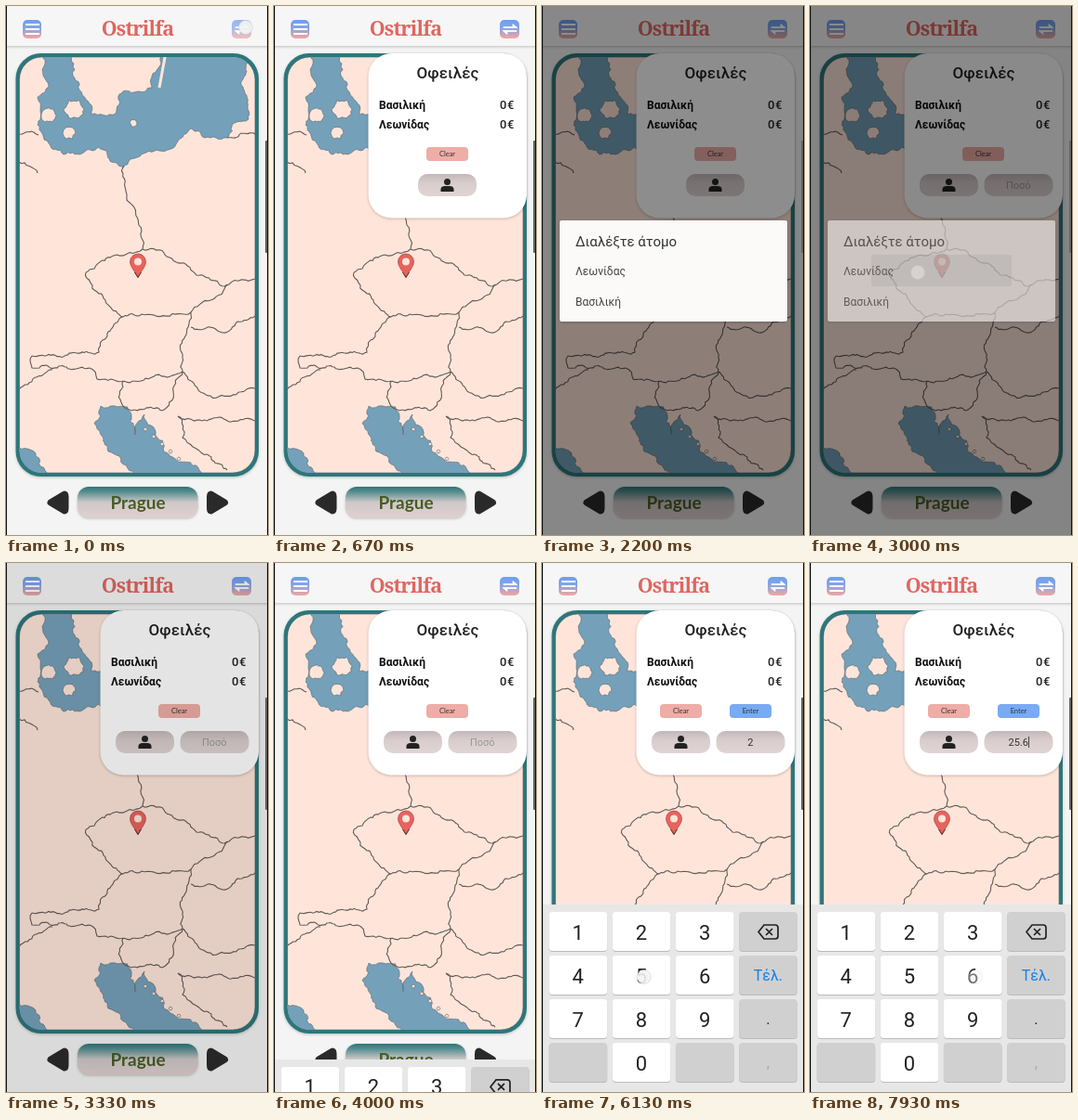
These frames come from a looping animation (282x570 px, 8000 ms). An HTML page:

```html
<!DOCTYPE html>
<html lang="el">
<head>
<meta charset="utf-8">
<title>Travel debts</title>
<style>
html, body { margin: 0; width: 100%; height: 100%; overflow: hidden; background: #f4f4f4; }
svg { display: block; width: 100vw; height: 100vh; font-family: Roboto, sans-serif; }
.lato { font-family: Lato, sans-serif; }
.mid { text-anchor: middle; }
.end { text-anchor: end; }
.shadow { filter: drop-shadow(0 1px 1.5px rgba(0, 0, 0, .22)); }
</style>
</head>
<body>
<svg id="stage" viewBox="0 0 282 570"></svg>
<script>
const LOOP = 8000;
const stage = document.getElementById('stage');

const rect = (x, y, w, h, r, fill, more = '') =>
  `<rect x="${x}" y="${y}" width="${w}" height="${h}" rx="${r}" fill="${fill}" ${more}/>`;
const text = (x, y, size, fill, str, more = '') =>
  `<text x="${x}" y="${y}" font-size="${size}" fill="${fill}" ${more}>${str}</text>`;
const gradient = (id, ...stops) => `<linearGradient id="${id}" x2="0" y2="1">${
  stops.map(([at, color]) => `<stop offset="${at}" stop-color="${color}"/>`).join('')}</linearGradient>`;

// Map: a few key points per line, made rugged by seeded midpoint displacement
let seed = 11;
const random = () => (seed = seed * 16807 % 2147483647) / 2147483647;

function split(a, b) {
  const dx = b[0] - a[0], dy = b[1] - a[1], len = Math.hypot(dx, dy);
  if (len < 4) return [b];
  const k = (random() - .5) * Math.min(.42, 7 / len);
  const m = [(a[0] + b[0]) / 2 - dy * k, (a[1] + b[1]) / 2 + dx * k];
  return [...split(a, m), ...split(m, b)];
}
const trace = pts => 'M' + pts.flatMap((p, i) => i ? split(pts[i - 1], p) : [p])
  .map(p => p.map(v => v.toFixed(1))).join('L');
const rugged = points => trace(points.split(' ').map(p => p.split(',').map(Number)));
const island = (x, y, r) => trace([0, 1, 2, 3, 4, 5, 0].map(i =>
  [x + r * Math.cos(i * Math.PI / 3), y + r * Math.sin(i * Math.PI / 3)]));

const baltic = '37,50 40,75 46,86 34,98 34,128 46,148 62,160 100,152 126,174 165,156 200,132 214,142 ' +
  '238,142 246,126 261,122 253,82 262,50 167,50 157,88 122,95 118,116 92,117 72,75 68,50';
const adriatic = '131,432 102,431 95,450 110,480 150,508 225,508 170,480 149,440 139,462 131,432';
const ligurian = '8,472 32,482 48,508 8,508';
const seas = [baltic, adriatic, ligurian].map(rugged).join('');
const dalmatia = [0, 1, 2, 3, 4].map(i => island(150 + i * 9, 456 + i * 8, 2));
const islands = [island(46, 118, 8), island(73, 111, 11), island(68, 137, 7), island(137, 126, 4), ...dalmatia].join('');
const borders = [
  '127,172 128,195 143,236 147,262',
  '86,287 119,268 147,262 170,266 205,290 240,300 268,294',
  '86,287 98,308 126,335 146,332 199,330 240,300',
  '126,335 104,360 100,373 28,377 28,390 90,390 98,402 145,404 190,394 194,354 199,330',
  '199,346 233,352 268,334',
  '126,404 124,427 135,436 168,436 190,394 220,420 268,412',
  '268,447 185,442 190,465 238,500',
  '14,413 50,392', '14,138 35,139', '14,168 34,180', '238,142 268,138'
].map(rugged).join('');

const map = `<g class="shadow">${rect(10.5, 51, 261.5, 456, 27, '#2d777b')}</g>
  <g clip-path="url(#land)" stroke="#5b6670" stroke-width=".6">${rect(14.5, 55, 253.5, 448, 24, '#ffe5d9')}
  <path d="${seas}" fill="#74a0b9"/><path d="${islands}" fill="#ffe5d9"/>
  <path d="M172 50L165 88" stroke="#ffe5d9" stroke-width="3"/>
  <path d="${borders}" fill="none" stroke="#625a58" stroke-width="1.1"/></g>
  <path d="M142 292.500C139 286 133.500 281 133.500 275.500A8.500 8.500 0 0 1 150.500 275.500C150.500 281 145 286 142 292.500Z" fill="#e9625d" stroke="#a8433f" stroke-width=".7"/>
  <path d="M138.500 287L142 292.500L145.500 287" fill="none" stroke="#5a2b2b"/>
  <circle cx="142" cy="275.500" r="4" fill="#ffe5d9"/>`;

const header = `<g class="shadow">${rect(0, 0, 282, 43, 0, '#f6f6f6')}</g>
  ${text(141.5, 32, 21.5, '#e0665f', 'Ostrilfa', 'class="mid" font-weight="700" letter-spacing="-.8" font-family="Noto Serif, serif"')}
  ${rect(18, 15, 20, 20, 5, 'url(#icon)')}
  <path d="M21 20H36M21 25H36M21 30H36" stroke="#fff" stroke-width="2"/>
  <g id="toggle">${rect(243, 15, 21, 20, 5, 'url(#icon)')}
  <path d="M247 22.500H257V19.500L262 23.500H247ZM261 27.500H251V30.500L246 26.500H261Z" fill="#fff" stroke="#fff" stroke-width=".8"/></g>`;

const arrow = 'M48 535L63 526Q64 526 64 529V541Q64 544 63 544Z';
const footer = `<g fill="#2a2a2a" stroke="#2a2a2a" stroke-width="7" stroke-linejoin="round">
  <path d="${arrow}"/><path d="${arrow}" transform="matrix(-1 0 0 1 283.500 0)"/></g>
  <g class="shadow">${rect(77, 518, 129.5, 33.5, 12, 'url(#city)')}</g>
  ${text(142, 542, 19, '#485c25', 'Prague', 'class="mid lato" font-weight="700"')}`;

const smallButton = (id, x, fill, label) => `<g id="${id}">${rect(x, 152, 45, 15, 4, fill)}
  ${text(x + 22.5, 162, 7.5, '#333', label, 'class="mid lato"')}</g>`;
const debtRow = (y, name) => text(113, y, 12, '#111', name, 'font-weight="700"') +
  text(259, y, 13, '#222', '0€', 'class="end" font-weight="500" letter-spacing=".6"');
const panel = `<g id="panel"><g class="shadow">${rect(101.5, 51, 170.5, 177.5, 25, '#fff')}</g>
  ${text(187, 78, 17, '#222', 'Οφειλές', 'class="mid" font-weight="500"')}
  ${debtRow(111, 'Βασιλική')}${debtRow(132, 'Λεωνίδας')}
  ${smallButton('clear', 164, '#eeada6', 'Clear')}${smallButton('enter', 202, '#79aaf2', 'Enter')}
  <g id="person">${rect(155, 181, 63, 24, 10, 'url(#field)')}${rect(155, 181, 63, 24, 10, '#4b5652', 'id="press"')}
  <circle cx="186.500" cy="189.500" r="3.500" fill="#222"/>
  <path d="M179.500 200V197Q180 194 184 194H189Q193 194 193.500 197V200Z" fill="#222"/></g>
  <g id="amount">${rect(187.5, 181, 74, 24, 10, 'url(#field)')}
  ${text(224.3, 197, 11, '#999', '', 'id="value" class="mid"')}
  ${rect(0, 187, 1, 12, 0, '#444', 'id="caret"')}</g></g>`;

const dialog = `${rect(0, 0, 282, 570, 0, '#000', 'id="dim"')}
  <g id="dialog"><g class="shadow">${rect(19, 231, 245, 109, 2, '#fcf9f9')}</g>
  ${rect(66, 268, 151, 34, 2, '#34554c', 'id="ripple"')}
  ${text(36, 259, 15, '#333', 'Διαλέξτε άτομο')}
  ${text(36, 290, 12, '#444', 'Λεωνίδας')}${text(36, 323, 12, '#444', 'Βασιλική')}</g>`;

const labels = ['1', '2', '3', '⌫', '4', '5', '6', 'Τέλ.', '7', '8', '9', '.', '', '0', '', ','];
const keySpot = i => [7.5 + i % 4 * 68.2, 376 + (i >> 2) * 47];
const keys = labels.map((label, i) => {
  const [x, y] = keySpot(i), digit = /\d/.test(label);
  const color = { ',': '#aaa', 'Τέλ.': '#1180ee' }[label] || '#222';
  const face = label === '⌫'
    ? '<path d="M239 390H251Q254 390 254 393V402Q254 405 251 405H239L233 397.500ZM241 394L248 401M248 394L241 401" fill="none" stroke="#222" stroke-width="1.700"/>'
    : text(x + 31.3, y + (digit ? 29.5 : 27), digit ? 22 : 16, color, label, 'class="mid"');
  return rect(x, y + 1, 62.7, 42, 4, '#bbb') + rect(x, y, 62.7, 42, 4, digit ? '#fff' : '#d0d0d0') + face;
}).join('');

stage.innerHTML = `<defs>
  ${gradient('icon', [0, '#6b9ff2'], [.45, '#86a5e4'], [1, '#f5a59f'])}
  ${gradient('city', [0, '#2b787b'], [.15, '#528b8d'], [.5, '#cfc8c8'], [1, '#e0d0d0'])}
  ${gradient('field', [0, '#c3b8b8'], [.4, '#d8cccc'], [1, '#e0d4d4'])}
  <clipPath id="land">${rect(14.5, 55, 253.5, 448, 24, '#000')}</clipPath></defs>
  ${rect(0, 0, 282, 570, 0, '#f4f4f4')}${map}${footer}${header}${panel}${dialog}
  <g id="keyboard">${rect(0, 368, 282, 202, 0, '#e7e7e7')}${keys}</g>
  <circle id="touch" r="7.500" fill="#f4f4f4" stroke="#ccc" stroke-width=".6"/>
  ${rect(279, 145, 3, 121, 1, '#666')}
  ${rect(0, 0, 1, 570, 0, '#111')}${rect(281, 0, 1, 570, 0, '#111')}`;

const el = Object.fromEntries([...stage.querySelectorAll('[id]')].map(e => [e.id, e]));
const ramp = (t, a, b) => Math.min(1, Math.max(0, (t - a) / (b - a)));
const smooth = k => k * k * (3 - 2 * k);
const show = (e, on) => e.setAttribute('opacity', Number(on));
const move = (e, x, y) => e.setAttribute('transform', `translate(${x} ${y})`);

// Every tap lasts equally long; a tapped key is entered after a fixed delay
const TAP = 330, ENTRY = 200, FOCUS = 4470;
const tap = (at, x, y) => ({ at, x, y });
const keyTap = (at, key) => {
  const [x, y] = keySpot(labels.indexOf(key));
  return { at, x: x + 34, y: y + 23, key };
};
const typing = [keyTap(5400, '2'), keyTap(6000, '5'), keyTap(6540, '.'), keyTap(7670, '6')];
const taps = [tap(-60, 258, 23), tap(1670, 194, 194), tap(2740, 116, 287), tap(3600, 224, 194), ...typing];

function drawAmount(t) {
  const typed = typing.filter(k => t >= k.at + ENTRY);
  const value = typed.map(k => k.key).join('');
  const lastEdit = typed.length ? typed[typed.length - 1].at + ENTRY : FOCUS;
  el.value.textContent = value || 'Ποσό';
  el.value.setAttribute('fill', value ? '#333' : '#999');
  const half = el.value.getComputedTextLength() / 2;
  el.caret.setAttribute('x', 224.3 + (value ? half : -half - .5));
  show(el.caret, t >= FOCUS && (t - lastEdit) % 1000 < 520);
  move(el.clear, value ? -37 : 0, 0);
  show(el.enter, value);
  el.enter.style.display = value ? '' : 'none';
}

function draw(t) {
  show(el.toggle, .7 + .3 * ramp(t, 270, 470));
  show(el.panel, smooth(ramp(t, 250, 650)));
  show(el.press, .85 * (ramp(t, 1650, 1800) - ramp(t, 1960, 2140)));

  const chosen = t >= 2930;
  move(el.person, chosen ? -37 : 0, 0);
  show(el.amount, chosen);
  drawAmount(t);

  show(el.dim, .6 * (ramp(t, 1940, 2290) - ramp(t, 2870, 3430)));
  show(el.dialog, ramp(t, 1960, 2130) - ramp(t, 2930, 3100));
  show(el.ripple, .1 * ramp(t, 2740, 2940));
  move(el.keyboard, 0, 204 * (1 - ramp(t, 3970, 4450)) ** 3);

  const touch = taps.find(p => t >= p.at && t < p.at + TAP);
  show(el.touch, touch ? .9 * ramp(touch.at + TAP - t, 0, 150) : 0);
  if (touch) move(el.touch, touch.x, touch.y);
}
// The enter button is shown by display alone
el.enter.removeAttribute('opacity');

const start = performance.now();
function frame() {
  draw((performance.now() - start) % LOOP);
  requestAnimationFrame(frame);
}
frame();
</script>
</body>
</html>
```
